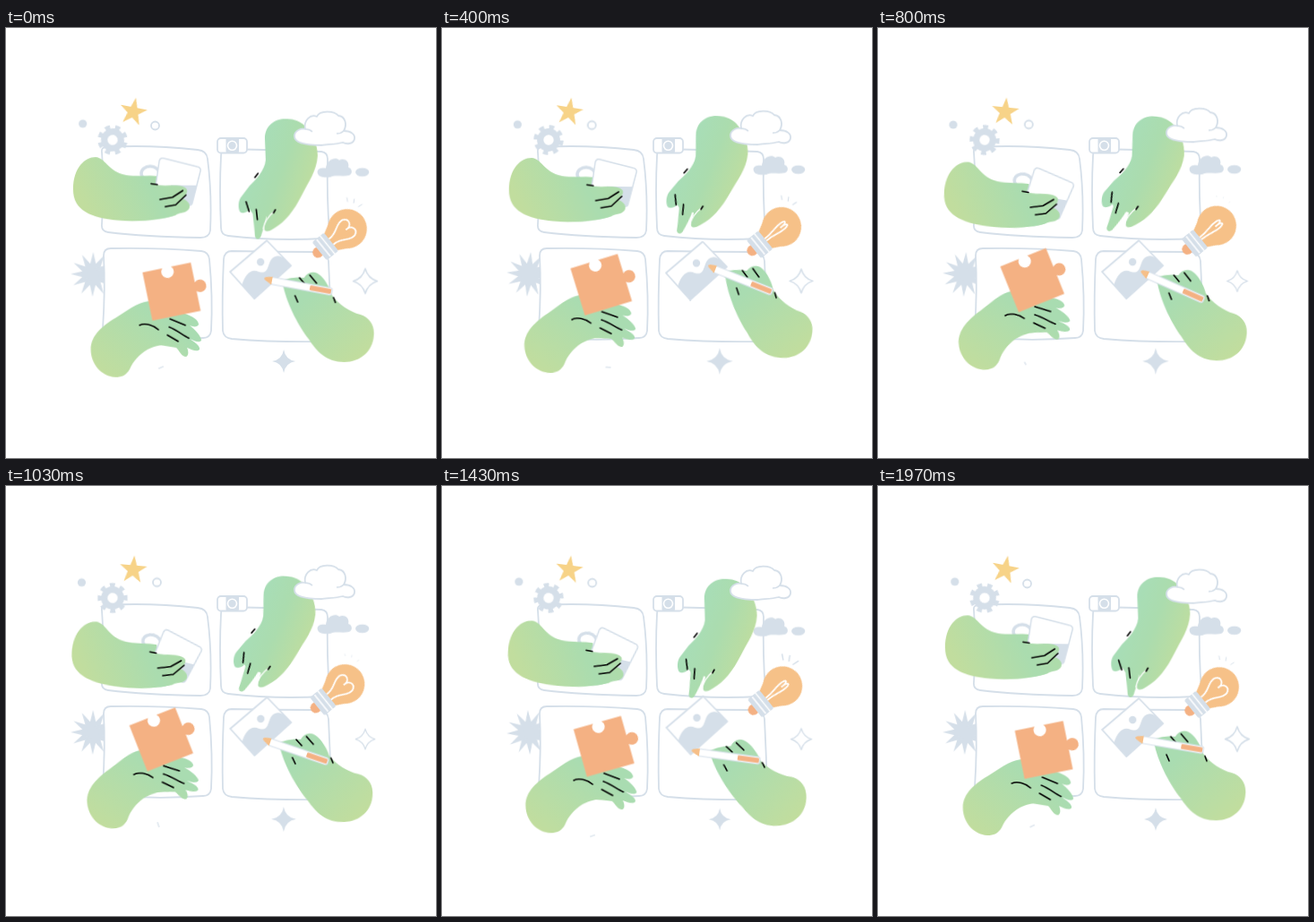
An HTML page that plays this animation: 480x480 px, repeating every 2 s.

```html
<!DOCTYPE html>
<html lang="en">
<head>
<meta charset="utf-8">
<title>Helping hands</title>
<style>
  html, body { margin: 0; width: 100%; height: 100%; overflow: hidden; background: #fff; }
  svg { display: block; width: 100vw; height: 100vh; }
  .line { fill: #fff; stroke: #d5dfe9; stroke-width: 1.8; stroke-linejoin: round; }
  .gray { fill: #d5dfe9; }
  .ink { fill: none; stroke: #000; stroke-width: 1.6; stroke-linecap: round; stroke-linejoin: round; }
  .orange { fill: #f4b183; }
  .ring { fill: none; stroke: #d5dfe9; }

  /* Sine swing from --a to --b and back; --d is the moment of pose --a. */
  .swing {
    animation: swing 1s cubic-bezier(.364, 0, .636, 1) infinite alternate;
    animation-delay: calc(var(--d) * 1ms - 2000ms);
  }
  @keyframes swing { from { transform: var(--a); } to { transform: var(--b); } }

  .mug-arm { --d: 150; --a: translate(0, -.3px); --b: translate(-1.5px, 7.5px) rotate(4deg); transform-origin: 97px 178px; }
  .mug { --d: 200; --a: rotate(-1deg); --b: rotate(11deg); transform-origin: 160px 175px; }
  .point-arm { --d: 1550; --a: translate(4.2px, 2px); --b: translate(-5.8px, -4px); }
  .point-hand { --d: 1750; --a: rotate(-.5deg); --b: rotate(4.3deg); transform-origin: 315px 118px; }
  .point-finger { --d: 1930; --a: rotate(-2.5deg); --b: rotate(17.5deg); transform-origin: 284px 200px; }
  .puzzle-arm { --d: 1830; --a: translate(.5px, 1.4px) rotate(.4deg); --b: translate(-4.3px, -7.5px) rotate(-5.3deg); transform-origin: 122px 360px; }
  .puzzle-fingers { --d: 1850; --a: rotate(.5deg); --b: rotate(-5deg); transform-origin: 165px 315px; }
  .puzzle { --d: 1930; --a: rotate(0deg); --b: translate(-2px, .8px) rotate(-5.4deg); transform-origin: 185px 293px; }
  .draw-arm { --d: 450; --a: translate(2.5px, -3.8px) rotate(4.4deg); --b: translate(-4.4px, 7.3px) rotate(-6deg); transform-origin: 378px 340px; }
  .pencil-shift { --d: 490; --a: translate(9.7px, -17px); --b: translate(-9.2px, 14px); }
  .pencil-turn { --d: 660; --a: rotate(24.8deg); --b: rotate(5.4deg); }
  .card { --d: 400; --a: translate(0, 1.5px); --b: translate(.5px, -2.3px); }
  .bulb { --d: 1800; --a: translate(.2px, .5px); --b: translate(-3px, -3.5px); }
  .cloud { --d: 130; --a: translate(0, 0); --b: translate(0, -5px); }
  .small-cloud { --d: 1630; --a: translate(0, 1px); --b: translate(0, -4px); }
  .star { --d: 0; --a: rotate(11deg); --b: rotate(5deg); }
  .dot { --d: 1700; --a: translate(.7px, -.5px); --b: translate(-1.6px, 1px); }
  .bubble { --d: 0; --a: translate(0, 0); --b: translate(2px, -1.5px); }
  .burst { --d: 1500; --a: rotate(-3deg); --b: rotate(5deg); }
  .spark { --d: 100; --a: scale(1); --b: scale(.8); }
  .spark-low { --d: 600; --a: scale(1.07); --b: scale(.86); }

  .gear { animation: gear 2s linear infinite; }
  @keyframes gear { from { transform: rotate(11.25deg); } to { transform: rotate(-33.75deg); } }

  .filament { animation: filament 1s ease-in-out infinite; }
  @keyframes filament { 0%, 100% { transform: scaleX(1); } 22%, 78% { transform: scaleX(.35); } }

  .rays path { animation: ray 2s linear infinite; }
  @keyframes ray {
    0%, 100% { transform: scale(.75); }
    11.5% { transform: scale(1.1); }
    28.5% { transform: scale(.5); }
    40% { transform: scale(.3); }
    51.5% { transform: scale(.4); }
    71.5% { transform: scale(1.1); }
    88.5% { transform: scale(.25); }
  }

  .dash { animation: dash 2s linear infinite; }
  @keyframes dash {
    0%, 100% { transform: translate(173px, 379px) rotate(-25deg); }
    11.5% { transform: translate(181px, 377.5px) rotate(0deg); }
    28.5% { transform: translate(190px, 380px) rotate(10deg); }
    29% { transform: translate(159px, 371px) rotate(50deg) scaleX(.3); }
    51.5% { transform: translate(170px, 378px) rotate(70deg); }
    65% { transform: translate(171px, 387px) rotate(70deg) scaleX(.4); }
    66% { transform: translate(171px, 387px) rotate(-20deg) scaleX(.4); }
    71.5% { transform: translate(168px, 390.5px) rotate(-20deg); }
    88.5% { transform: translate(166.5px, 384px) rotate(-40deg); }
  }
</style>
</head>
<body>
<svg viewBox="0 0 480 480">
  <defs>
    <linearGradient id="g1" gradientUnits="userSpaceOnUse" x1="92" y1="206" x2="180" y2="160">
      <stop stop-color="#c1dd9e"/><stop offset=".75" stop-color="#aadcaf"/><stop offset="1" stop-color="#aedcab"/>
    </linearGradient>
    <linearGradient id="g2" gradientUnits="userSpaceOnUse" x1="282" y1="150" x2="345" y2="172">
      <stop stop-color="#a8ddb6"/><stop offset=".4" stop-color="#abdcae"/><stop offset="1" stop-color="#bfdd9f"/>
    </linearGradient>
    <linearGradient id="g3" gradientUnits="userSpaceOnUse" x1="110" y1="385" x2="165" y2="315">
      <stop stop-color="#c1dd9e"/><stop offset="1" stop-color="#a9dcb1"/>
    </linearGradient>
    <linearGradient id="g4" gradientUnits="userSpaceOnUse" x1="392" y1="368" x2="335" y2="300">
      <stop stop-color="#c1dd9e"/><stop offset="1" stop-color="#a9dcb1"/>
    </linearGradient>
    <path id="spike" d="M0-25 6 0 0 25-6 0Z"/>
    <path id="twinkle" d="M0-14Q2-2 14 0Q2 2 0 14Q-2 2-14 0Q-2-2 0-14Z"/>
  </defs>

  <g transform="translate(97 275)"><g class="swing burst gray">
    <use href="#spike"/>
    <use href="#spike" transform="rotate(30)"/>
    <use href="#spike" transform="rotate(60)"/>
    <use href="#spike" transform="rotate(90)"/>
    <use href="#spike" transform="rotate(120)"/>
    <use href="#spike" transform="rotate(150)"/>
  </g></g>

  <!-- panels -->
  <g class="line">
    <path d="M112 133Q160 130 214 136Q224 137 225 146Q230 185 228 226Q227 234 217 234Q155 233 114 228Q106 227 107 219Q110 175 107 139Q106 133 112 133Z"/>
    <path d="M245 135Q300 136 352 138Q359 139 359 146Q358 190 361 228Q361 235 354 235Q300 238 248 232Q240 231 240 223Q238 180 240 143Q240 135 245 135Z"/>
    <path d="M117 246Q170 245 218 249Q226 250 227 258Q231 300 229 338Q228 346 220 346Q165 350 116 345Q108 344 108 336Q111 290 109 254Q109 246 117 246Z"/>
    <path d="M252 249Q300 250 350 250Q359 251 360 260Q362 300 363 342Q363 350 355 350Q300 351 252 347Q243 346 242 338Q241 300 243 258Q244 249 252 249Z"/>
  </g>

  <!-- small ornaments -->
  <g transform="translate(142 93.5)">
    <path class="swing star" fill="#f7d388" d="M0-16 3.7-5.1 15.2-4.9 6 2 9.4 13.4 0 6.6-9.4 13.4-6 2-15.2-4.9-3.7-5.1Z"/>
  </g>
  <g transform="translate(119 125)"><g class="gear ring">
    <circle r="9.3" stroke-width="7.2"/>
    <circle r="14.2" stroke-width="5" pathLength="16" stroke-dasharray="1 1"/>
  </g></g>
  <circle class="swing dot gray" cx="85.5" cy="107" r="4.6"/>
  <circle class="swing bubble line" cx="166.5" cy="109" r="4.5"/>
  <g>
    <rect class="line" x="236" y="123" width="33" height="16.5" rx="4"/>
    <rect class="gray" x="245.5" y="122" width="14.5" height="18" rx="2"/>
    <circle cx="252.5" cy="131.3" r="5" fill="none" stroke="#fff" stroke-width="1.6"/>
  </g>
  <g class="swing small-cloud gray">
    <path d="M348 163C346 158 352 156 357 157C358 147 368 144 372 148C378 145 384 150 382 156C387 157 387 164 383 165C375 167 368 164 362 167C356 168 349 167 348 163Z"/>
    <ellipse cx="397.7" cy="161.5" rx="7.6" ry="4.8"/>
  </g>
  <g transform="translate(401 282.5)"><g class="swing spark">
    <path class="line" style="stroke-width:1.6" d="M0-14Q3-3 13.5 0Q3 3 0 14Q-3 3-13.5 0Q-3-3 0-14Z"/>
  </g></g>
  <g transform="translate(310 372)"><g class="swing spark-low gray"><use href="#twinkle"/></g></g>
  <path class="dash ring" stroke-width="1.2" d="M-3 0H3"/>

  <!-- picture card -->
  <g class="swing card">
    <path class="line" d="M291 237 318 265 277 302 250 272Z"/>
    <path class="gray" d="M263 287C267 275 273 268 282 272C296 276 290 259 300 255C307 252 312 259 318 265L277 302Z"/>
    <circle class="gray" cx="284" cy="261" r="4.2"/>
  </g>

  <!-- arm with mug -->
  <g class="swing mug-arm">
    <g class="swing mug"><ellipse class="ring" cx="161" cy="162" rx="10" ry="8" stroke-width="3.5"/></g>
    <path fill="url(#g1)" d="M75 180C75 156 88 144 100 144C111 145 113 158 130 163C145 167 158 163 169 165L170 172L190 190L190 208C178 213 150 217 125 214.5C96 212 75 204 75 180Z"/>
    <g class="swing mug">
      <path class="line" style="stroke-width:1.5" d="M176 145 213 154Q218 155 217 159L208 195Q207 198 203 197L169 189Q165 188 166 185L171 148Q172 144 176 145Z"/>
      <path class="gray" d="M213 175 208 195Q207 198 203 197L180 191 184 175Z"/>
    </g>
    <path fill="url(#g1)" d="M148 174 162 173C175 178 188 173 199 177C205 180 202 185 197 190C203 192 206 196 205 200C203 206 196 205 190 208C180 212 165 213 148 214Z"/>
    <path class="ink" d="M162 173.500 169 174.500M172 191 186 188.500 197.500 181M178 199 189.500 197 201 186"/>
  </g>

  <!-- pointing arm -->
  <g class="swing point-arm"><g class="swing point-hand">
    <path class="swing point-finger" fill="url(#g2)" d="M275 194 292 198C292 208 288 222 284.500 231C283 238 277 237 277 232C277 222 275 208 275 194Z"/>
    <path fill="url(#g2)" d="M289 124C289 108 302 101 314 102C322 102 328 105 333 109C342 118 348 130 348 143C347 160 338 172 330 188C322 204 312 217 300 224C296 227 291 229 289 226C288 221 291 216 291 211L276 208L272 203C270 207 263 209 261 205C259 199 260 193 263 189L272 177C279 170 289 160 290 148Z"/>
    <path d="M300 205C294 210 289 216 287.500 225" fill="none" stroke="#fff" stroke-width="1.3"/>
    <path class="ink" d="M278 167.500 281.500 163M299 207 301 203.500"/>
    <path class="swing point-finger ink" d="M268.500 194 271.500 205M279.500 203 280.500 214.500"/>
  </g></g>

  <g class="swing cloud">
    <path class="line" d="M322 121C322 114 330 112 334 113C332 103 340 96 347 99C350 92 366 92 371 98C379 99 381 108 377 115C385 115 390 119 389 124C388 130 380 130 376 128C368 130 358 130 352 131C342 131 322 130 322 121Z"/>
    <path class="ring" stroke-width="1.5" d="M334 113Q339 113 342 116M377 115Q374 118 369 118"/>
  </g>

  <!-- light bulb -->
  <g class="swing bulb">
    <g transform="translate(381 224) rotate(51)">
      <circle class="orange" cy="42" r="6"/>
      <circle r="22" fill="#f6c188"/>
      <path fill="#f6c188" d="M-19 10-11 25H11L19 10Z"/>
      <rect class="gray" x="-13" y="23" width="26" height="17" rx="2"/>
      <path d="M-13 28.500H13M-12 34H12" stroke="#fff" stroke-width="1.500"/>
      <path class="filament" fill="none" stroke="#fff" stroke-width="1.800" vector-effect="non-scaling-stroke" d="M-4 23C-3 11-13 7-11-2C-8-10 1-6 0 2C-1-6 8-10 11-2C13 7 3 11 4 23"/>
    </g>
    <g class="rays ring" stroke-width="1.300">
      <g transform="translate(381 191.500)"><path d="M-.6-3.300.6 3.300"/></g>
      <g transform="translate(388.500 193)"><path d="M.5-3.300-.5 3.300"/></g>
      <g transform="translate(395.500 198)"><path d="M-3 2 3-2"/></g>
    </g>
  </g>

  <!-- arm with puzzle piece -->
  <g class="swing puzzle-arm">
    <path class="swing puzzle-fingers" fill="url(#g3)" d="M165 305 200 318C208 321 215 325 215 330C214 333 209 333 205 331C211 336 218 343 218 348C215 351 210 348 205 346C211 350 217 354 216 358C213 361 207 358 202 356C204 360 204 365 201 366C196 366 194 360 190 356L165 352Z"/>
    <path fill="url(#g3)" d="M94.500 358C94.500 342 108 331 125 321C140 311 150 304 163 304L192 320L190 353C182 351 168 353 158 358C148 364 142 371 138 380C134 387 129 389 122 389C106 388 94.500 374 94.500 358Z"/>
    <g class="swing puzzle">
      <path class="orange" transform="translate(184.700 293.500) rotate(-11.500)" d="M-27.500-27.500H-5A7 7 0 1 0 5-27.500H27.500V-5A7 7 0 1 1 27.500 5V27.500H-27.500Z"/>
    </g>
    <path class="ink" d="M149 331C155 328 165 331 170 336M183 324 200 331M182 333C190 336 197 342 204 345.500M180 342 192 349"/>
  </g>

  <!-- drawing arm -->
  <g class="swing draw-arm">
    <path fill="url(#g4)" d="M310 288C308 286 306 284 307 282C312 279 320 278 326 277.500L333 278C338 270 346 270 352 276C358 282 362 290 364 297C372 308 384 316 396 319C406 322 412 331 411 342C410 360 396 372 378 372C358 372 347 360 338 346C328 333 315 310 310 288Z"/>
    <path class="ink" d="M328 278 334 285M339.500 275 347 284M366 300 368 305.500M323 298 326 305"/>
  </g>
  <g transform="translate(287.500 282.500)"><g class="swing pencil-shift"><g class="swing pencil-turn">
    <rect class="line" style="stroke-width:1.200" x="8" y="-4" width="69" height="8" rx="2"/>
    <path fill="#f6bf88" d="M0-1Q0-2 2-3L9-4.500V4.500L2 1Q0 0 0-1Z"/>
    <rect class="orange" x="52" y="-2.800" width="24" height="5.600" rx="1"/>
  </g></g></g>
</svg>
</body>
</html>
```
